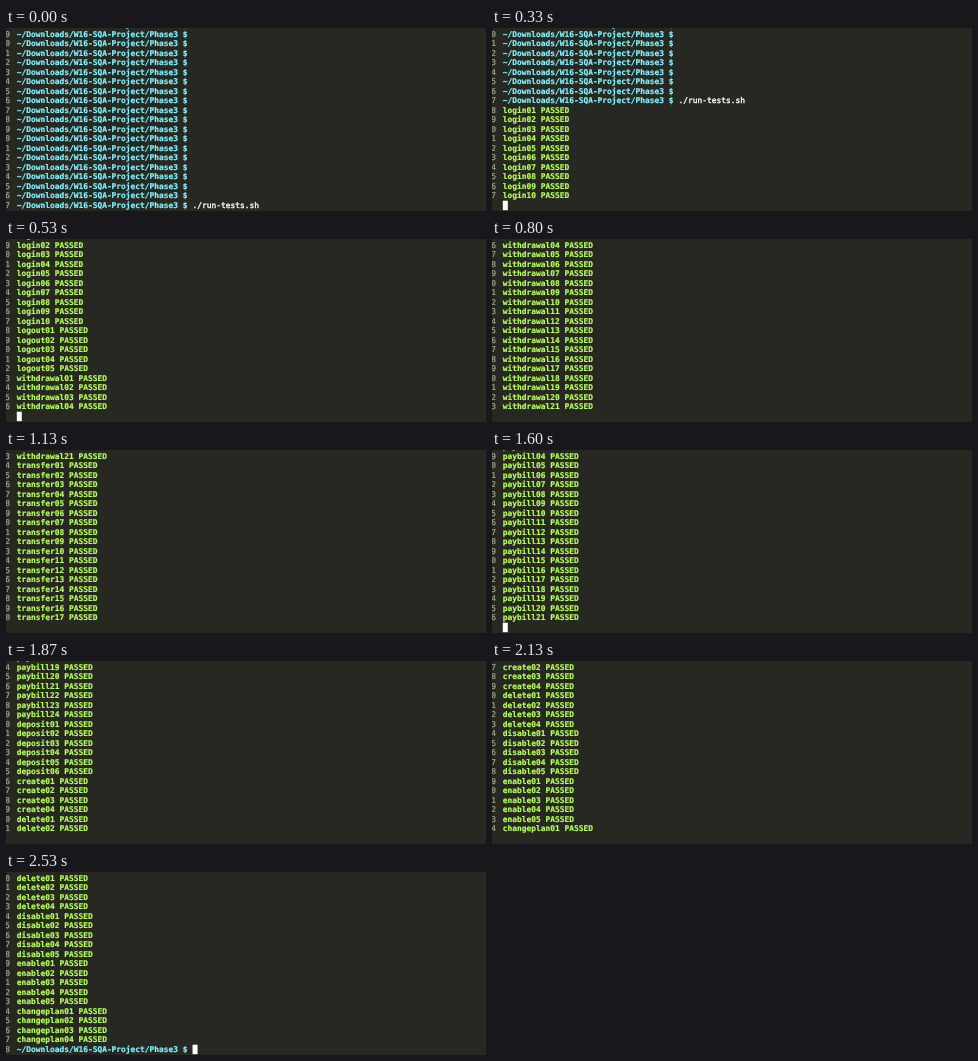
An HTML page for the animation above (2590 ms loop, 480 by 183 pixels).

```html
<!DOCTYPE html>
<html lang="en">
<head>
<meta charset="utf-8">
<title>Test run</title>
<style>
  html, body { margin: 0; width: 100%; height: 100%; overflow: hidden; background: #272822; }
  svg { display: block; width: 480px; height: 183px; }
  text {
    font: bold 7.89px "DejaVu Sans Mono", monospace; white-space: pre;
    fill: currentColor; stroke: currentColor; stroke-width: 0.22px;
  }
  .num { color: #a3a49c; font-weight: normal; }
  .pass { color: #b6ff58; }
  .prompt { color: #80f4ff; }
  .cmd { color: #ffffff; font-weight: normal; stroke-width: 0.35px; }
</style>
</head>
<body>
<svg id="stage" viewBox="0 0 480 183">
  <rect width="480" height="183" fill="#272822"/>
</svg>
<script>
const LOOP = 2590, FPS = 15;
const ROWS = 20; // the top row is almost fully above the edge
const LEFT = 10.8, PITCH = 9.5, BASE = -0.7, CHAR = 4.75;
const PROMPT = "~/Downloads/W16-SQA-Project/Phase3 $";
const COMMAND = "./run-tests.sh";
const COMMAND_X = LEFT + (PROMPT.length + 1) * CHAR;
const FIRST = 18, DONE_TICK = 34;

const suites = [
  ["login", 10], ["logout", 5], ["withdrawal", 21], ["transfer", 22], ["paybill", 24],
  ["deposit", 6], ["create", 4], ["delete", 4], ["disable", 5], ["enable", 5], ["changeplan", 4]
];
const results = suites.flatMap(([name, count]) =>
  Array.from({ length: count }, (_, i) => `${name}${String(i + 1).padStart(2, "0")} PASSED`));
const LAST = FIRST + results.length;

// [tick, line number on the bottom row]
const scroll = [[2, 19], [8, 37], [12, 54], [17, 71], [24, 97], [28, 112], [33, LAST]];

const stage = document.getElementById("stage");
function add(tag, attrs) {
  const el = document.createElementNS("http://www.w3.org/2000/svg", tag);
  for (const key in attrs) el.setAttribute(key, attrs[key]);
  return stage.appendChild(el);
}

const rows = Array.from({ length: ROWS }, (_, i) => {
  const y = BASE + i * PITCH;
  return {
    num: add("text", { x: -0.7, y, class: "num" }),
    body: add("text", { x: LEFT, y }),
    cmd: add("text", { x: COMMAND_X, y, class: "cmd" })
  };
});
const cursor = add("rect", { y: 172.7, width: 5, height: 9.5, fill: "#ffffff" });

function bottomLine(tick) {
  if (tick < 2) return FIRST - 1;
  for (let i = 1; i < scroll.length; i++) {
    const [t0, n0] = scroll[i - 1], [t1, n1] = scroll[i];
    if (tick <= t1) return Math.round(n0 + (n1 - n0) * (tick - t0) / (t1 - t0));
  }
  return LAST;
}

function draw(ms) {
  const t = Math.floor(ms / 10) * 10;
  const tick = Math.floor((t + 4) * FPS / 1000);
  const bottom = bottomLine(tick);
  const running = tick >= 2 && tick < DONE_TICK;

  rows.forEach((row, i) => {
    const line = bottom - ROWS + 1 + i;
    const blank = running && line === bottom;
    const isPrompt = line < FIRST || line >= LAST;
    row.num.textContent = blank ? "" : (line + 10) % 10;
    row.body.textContent = blank ? "" : isPrompt ? PROMPT : results[line - FIRST];
    row.body.setAttribute("class", isPrompt ? "prompt" : "pass");
    row.cmd.textContent = line === FIRST - 1 ? COMMAND : "";
  });

  const phase = t % 1000;
  cursor.setAttribute("x", running ? LEFT : COMMAND_X);
  cursor.setAttribute("visibility", phase >= 240 && phase < 740 ? "visible" : "hidden");
}

const start = performance.now();
function loop() {
  draw((performance.now() - start) % LOOP);
  requestAnimationFrame(loop);
}
loop();
</script>
</body>
</html>
```
